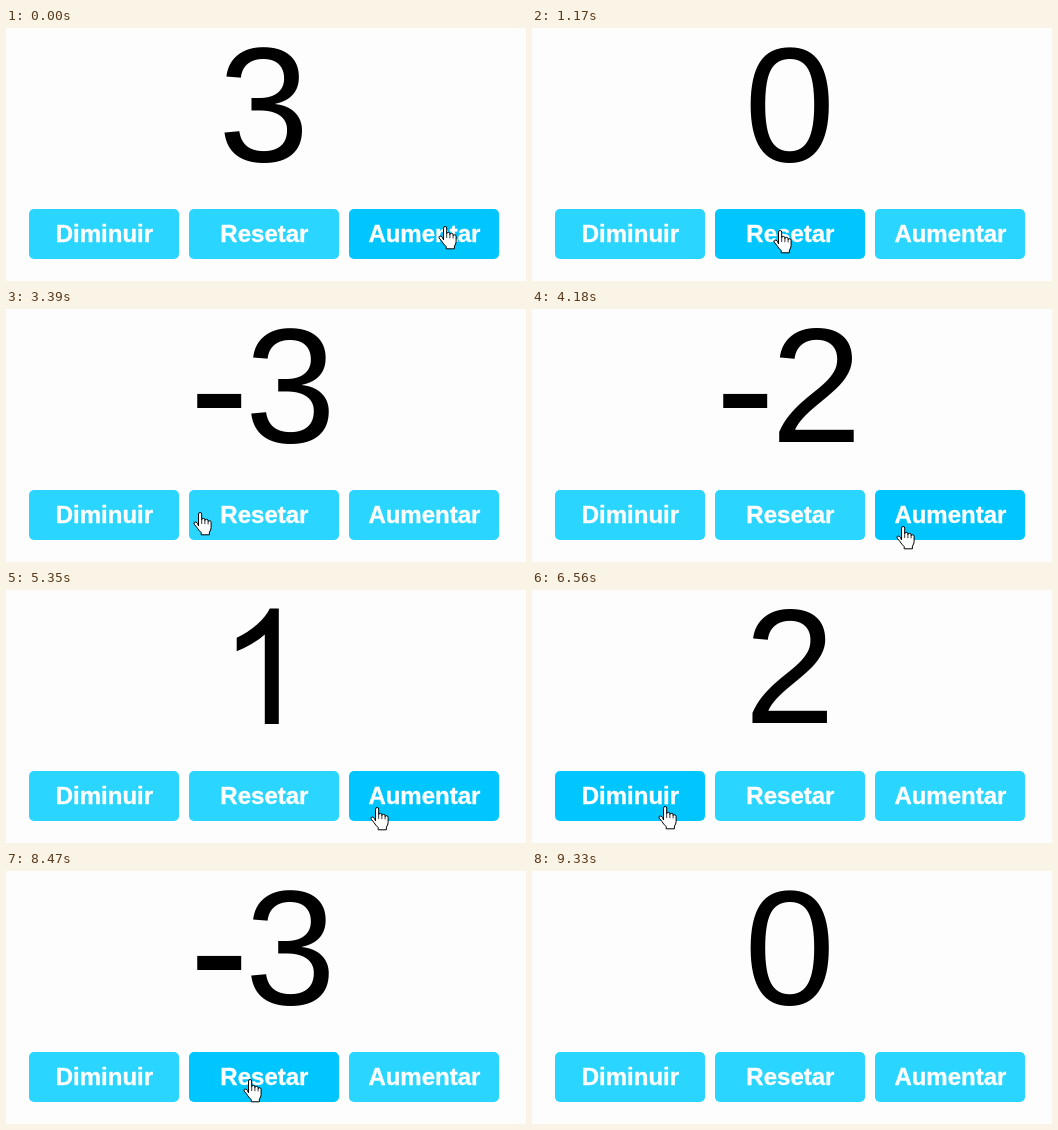
An HTML page for the animation above (9790 ms loop, 520 px wide and 253 px high).

```html
<!DOCTYPE html>
<html lang="pt">
<head>
<meta charset="utf-8">
<title>Contador</title>
<style>
  html, body { margin: 0; width: 100%; height: 100%; overflow: hidden; background: #fdfdfd; }
  svg { display: block; width: 520px; height: 253px; font-family: "Liberation Sans", Arial, sans-serif; }
  .value { font-size: 163.5px; text-anchor: middle; }
  #minus { font-size: 180px; }
  .label { font-size: 24px; font-weight: bold; text-anchor: middle; fill: #fff; stroke: #fff; stroke-width: .35; }
</style>
</head>
<body>
<svg viewBox="0 0 520 253">
  <rect width="520" height="253" fill="#fdfdfd"/>
  <text id="minus" class="value" x="213.2" y="140.4">-</text>
  <text id="digit" class="value" y="133"></text>
  <!-- The numeral one has no foot -->
  <path id="one" d="M15.1 134H1.1V44.4Q-4 49.2-12.2 54.1T-27 61.3V47.8Q-15.2 42.2-6.4 34.3T6.1 18.5H15.1Z"/>
  <g id="buttons"></g>
  <g id="hand" stroke="#000" stroke-linecap="round" stroke-linejoin="round">
    <path fill="#fff" stroke-width="1" d="M5.5 13.5V2.1a1.6 1.6 0 0 1 3.2 0V7.7a1.6 1.4 0 0 1 3.2.2V8.5a1.6 1.4 0 0 1 3.2.4V9.5a1.6 1.4 0 0 1 3 .7V15.7Q18 18.1 16.4 20.1V22.8H8.2V20.6Q5.5 18.2 3.8 15.3L1.2 12.1Q.4 10.7 1.7 10.1T4.2 11.1Z"/>
    <path fill="none" stroke-width=".8" d="M8.7 7.9V11.6M11.9 8.5V11.8M15.1 9.5V12"/>
  </g>
</svg>
<script>
const LOOP = 9790;
const HOP = 130;
const IDLE = "#2ad5ff", HOVER = "#00c6ff";
const DOWN = 0, RESET = 1, UP = 2;
const NS = "http://www.w3.org/2000/svg";
const $ = id => document.getElementById(id);

// The pointer sets off at `depart`, reaches x, y in some hops, then clicks at a steady pace.
const stops = [
  { button: UP, x: 432, y: 198, depart: -HOP, hops: 1, clicks: 0 },
  { button: RESET, x: 241, y: 202, depart: 170, hops: 4, clicks: 1, first: 1020, gap: 0 },
  { button: DOWN, x: 92, y: 195, depart: 1180, hops: 1, clicks: 3, first: 1920, gap: 660 },
  { button: UP, x: 364, y: 217, depart: 3240, hops: 4, clicks: 6, first: 4180, gap: 356 },
  { button: DOWN, x: 126, y: 216, depart: 6020, hops: 3, clicks: 6, first: 6560, gap: 297 },
  { button: RESET, x: 237, y: 208, depart: 8060, hops: 3, clicks: 1, first: 8760, gap: 0 },
  { x: 450, y: 256, depart: 8930, hops: 3, clicks: 0 }
];

function add(tag, attrs, text = "") {
  const el = document.createElementNS(NS, tag);
  for (const key in attrs) el.setAttribute(key, attrs[key]);
  el.textContent = text;
  return $("buttons").appendChild(el);
}

const boxes = ["Diminuir", "Resetar", "Aumentar"].map((name, i) => {
  const x = 23 + i * 160;
  const box = add("rect", { x, y: 181, width: 150, height: 50, rx: 5 });
  add("text", { x: x + 75.4, y: 214, class: "label" }, name);
  return box;
});

const show = (el, on) => el.setAttribute("visibility", on ? "visible" : "hidden");
const mix = (a, b, k) => a + (b - a) * k;

function count(t) {
  let value = 3;
  for (const { button, clicks, first, gap } of stops)
    for (let i = 0; i < clicks; i++)
      if (t >= first + i * gap) value = button === RESET ? 0 : value + button - 1;
  return value;
}

// The pointer moves in discrete hops; a button lights only under a resting pointer.
function pointer(t) {
  const i = stops.findLastIndex(s => s.depart <= t);
  const to = stops[i], from = stops[i - 1] || to;
  const p = Math.min(1, Math.floor((t - to.depart) / HOP) / to.hops);
  const k = 1 - (1 - p) ** 1.5;
  const lit = p === 0 ? from.button : p === 1 ? to.button : undefined;
  return { x: mix(from.x, to.x, k), y: mix(from.y, to.y, k), lit };
}

function draw(t) {
  const value = count(t), size = Math.abs(value);
  const center = value < 0 ? 284.5 : 257.7;
  show($("minus"), value < 0);
  show($("digit"), size !== 1);
  show($("one"), size === 1);
  $("digit").textContent = size;
  $("digit").setAttribute("x", center);
  $("one").setAttribute("transform", `translate(${center})`);

  const { x, y, lit } = pointer(t);
  $("hand").setAttribute("transform", `translate(${Math.round(x)} ${Math.round(y)})`);
  boxes.forEach((box, i) => box.setAttribute("fill", i === lit ? HOVER : IDLE));
}

const start = performance.now();
function tick(now) {
  draw(Math.max(0, now - start) % LOOP);
  requestAnimationFrame(tick);
}
draw(0);
requestAnimationFrame(tick);
</script>
</body>
</html>
```
